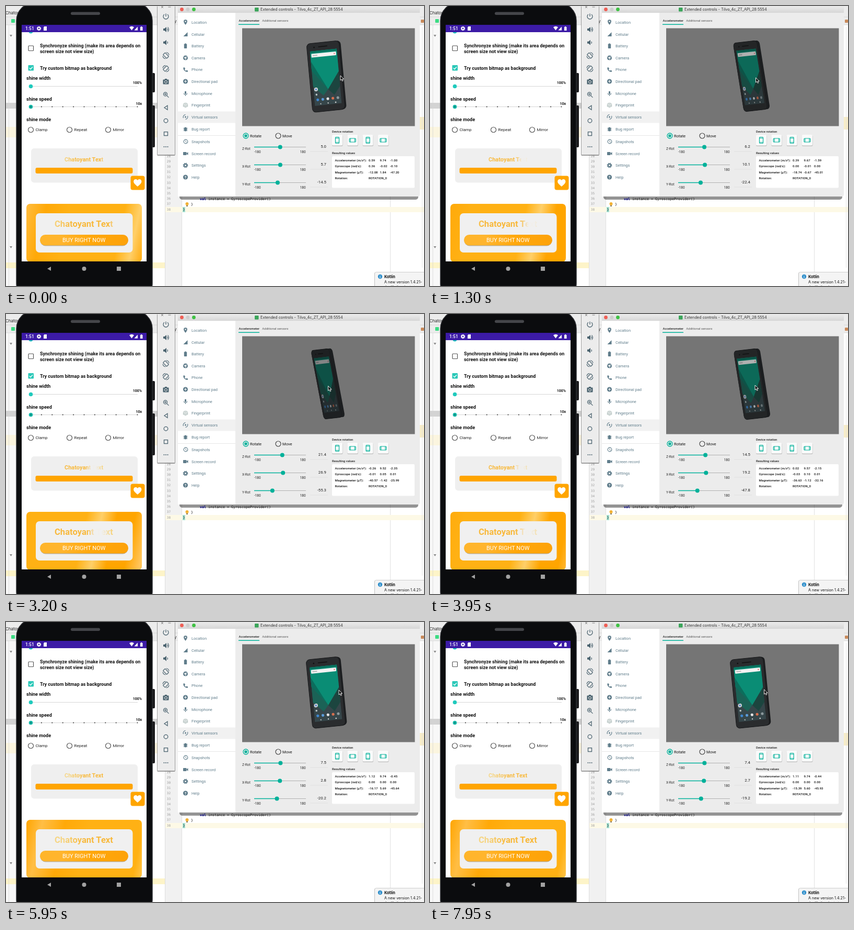
These frames come from a looping animation (800x535 px, 8000 ms). An HTML page:

```html
<!DOCTYPE html>
<html lang="en">
<head>
<meta charset="utf-8">
<title>Shining views</title>
<style>
html, body { margin: 0; width: 100%; height: 100%; overflow: hidden; background: #fff; }
svg { display: block; width: 100vw; height: 100vh; }
text { font-family: Roboto, sans-serif; white-space: pre; }
.ui { font-family: Inter, sans-serif; }
.code { font-family: "DejaVu Sans Mono", monospace; }
</style>
</head>
<body>
<svg id="stage" viewBox="0 0 800 535"></svg>
<script>
const GREEN = '#00b19a', SLATE = '#607d8b', ORANGE = '#ffa500', AMBER = '#ffb114';
const rect = (x, y, w, h, fill, r = 0, more = '') =>
  `<rect x="${x}" y="${y}" width="${w}" height="${h}" rx="${r}" fill="${fill}" ${more}/>`;
const circle = (x, y, r, fill, more = '') => `<circle cx="${x}" cy="${y}" r="${r}" fill="${fill}" ${more}/>`;
const path = (d, fill, more = '') => `<path d="${d}" fill="${fill}" ${more}/>`;
const line = (d, color, w = 1) => path(d, 'none', `stroke="${color}" stroke-width="${w}"`);
const text = (x, y, size, str, fill = '#111', more = '') =>
  `<text x="${x}" y="${y}" font-size="${size}" fill="${fill}" ${more}>${str}</text>`;
const at = (x, y, body) => `<g transform="translate(${x} ${y})">${body}</g>`;
const BOLD = 'font-weight="700"', MED = 'font-weight="500"', END = 'text-anchor="end"';

const gradient = (id, stops) => `<linearGradient id="${id}">` +
  stops.map(([o, c]) => `<stop offset="${o}" stop-color="${c}"/>`).join('') + '</linearGradient>';

// Moving gradients keep their main highlight in the middle of the span
const ink = (base, pale, glow) =>
  [[0, pale], [.06, pale], [.2, base], [.43, base], [.49, glow], [.53, glow], [.59, pale], [.8, base]];
const sheen = [[0, ORANGE], [.06, ORANGE], [.115, '#ffbe45'], [.19, '#ffa908'], [.27, AMBER], [.45, AMBER],
  [.5, '#ffcf68'], [.55, ORANGE], [.61, ORANGE], [.66, '#ffc55c'], [.71, ORANGE]];

const defs = `<defs>
  ${gradient('inkSmall', ink('#f8b93c', '#f6d583', '#f0eeea'))}
  ${gradient('inkBig', ink('#f8b93c', '#f6d583', '#f1efeb'))}
  ${gradient('sheen', sheen)}
  ${gradient('pill', [[0, '#ffb52a'], [.25, '#ffb52e'], [.6, '#ffa70a'], [1, '#fda20a']])}
  <linearGradient id="bar" x2="0" y2="1"><stop stop-color="#ececec"/><stop offset="1" stop-color="#d6d6d6"/></linearGradient>
  <clipPath id="app">${rect(30, 50, 239, 438, '#fff')}</clipPath>
  <filter id="soft" x="-20%" y="-20%" width="140%" height="150%"><feGaussianBlur stdDeviation="9"/></filter>
  <filter id="edge" x="-20%" y="-20%" width="140%" height="150%"><feGaussianBlur stdDeviation="1"/></filter>
</defs>`;

function editor() {
  let s = rect(0, 0, 800, 535, '#fff') + rect(0, 0, 800, 36, '#ececec') + rect(0, 36, 22, 499, '#f8f8f8');
  s += line('M0 21H800M0 36H800', '#cfcfcf', .7);
  s += text(-1, 16, 8, 'Chatoy', '#222', 'class="ui"') + text(316, 32, 8, 'Gy', '#222', 'class="ui"');
  s += rect(10, 25, 7, 7, '#3ddc84', 1);
  s += rect(0, 185, 305, 11, '#d3d3d3') + rect(0, 231, 305, 20, '#fbf5df') + rect(0, 490, 305, 11, '#fdf4c8');
  s += line('M5.5 36V535', '#d2d2d2', .7) + path('M7 459h5l-2.5 4z', '#888') + path('M7 55h5l-2.5 4z', '#888');
  s += rect(304, 36, 32, 499, '#f1f1f1') + line('M304.5 36V535M336.5 36V535M735.5 36V535', '#d5d5d5', .7);
  s += rect(305, 384, 495, 10, '#fdf9e6') + rect(338, 384, 5, 10, '#a5e3d5');
  for (let i = 28; i < 39; i++) s += text(315, 390.5 - (38 - i) * 10.2, 6, i, '#999', `class="code" ${END}`);
  s += rect(792, 212, 8, 24, '#f8edc8') + rect(794, 26, 6, 6, '#c98a5a', 1) + line('M796.5 40V500', '#ddd', .7);
  return s;
}

function code() {
  return text(371, 371, 6.65, '<tspan fill="#000080" font-weight="700">val</tspan> instance = GyroscopeProvider()', '#111', 'class="code"') +
    text(354, 381, 6.65, '}', '#111', 'class="code"') + text(338.5, 391, 6.65, '}', '#111', 'class="code"') +
    circle(346.5, 378, 3, '#f2b134') + rect(345, 381, 3, 2, '#8a7a55');
}

function notice() {
  return rect(705, 509, 110, 40, '#aaa', 3, 'filter="edge"') + rect(705.5, 508.5, 110, 40, '#f4f4f4', 3, 'stroke="#bcbcbc" stroke-width=".7"') +
    circle(716, 517, 4.2, '#2f8fcb') + text(714.9, 520, 7, 'i', '#fff', BOLD) +
    text(724, 520, 7.4, 'Kotlin', '#111', 'class="ui" font-weight="700"') +
    text(724, 530, 7.2, 'A new version 1.4.21-', '#111', 'class="ui"') +
    text(724, 539.5, 7.2, 'the Kotlin plugin is', '#111', 'class="ui"');
}

function handset() {
  let s = rect(279, 128, 6, 37, '#1b1b1d', 2) + rect(279, 190, 6, 80, '#1b1b1d', 2);
  s += rect(20, -6, 260, 570, '#0b0c0e', 34, 'stroke="#2b2c30" stroke-width="1.500"');
  s += rect(124, 11.5, 56, 5.5, '#45464a', 2.7);
  s += rect(30, 36, 239, 14, '#3c1ba6') + text(37, 46, 8.5, '1:51', '#fff', MED);
  s += circle(63, 43, 2.4, 'none', 'stroke="#fff" stroke-width="2"') + circle(63, 43, 3.8, 'none', 'stroke="#fff" stroke-width="1" stroke-dasharray="1.5 1.5"');
  s += path('M73.5 39h4.5v8h-6v-6.5z', '#fff');
  s += path('M236 40.5q4.5-3.5 9 0l-4.5 6z', '#fff') + path('M252 39.5v7h-6.5z', '#fff') + rect(257, 40, 4.5, 7, '#fff', .6) + rect(258.2, 39, 2, 1.5, '#fff');
  s += rect(30, 50, 239, 438, '#fff') + `<g clip-path="url(#app)">` + form() + cards() + '</g>';
  s += path('M86 498v8l-7-4z', '#a2a2a2') + circle(149.5, 502, 4, '#a2a2a2') + rect(212, 498, 8, 8, '#a2a2a2');
  return s;
}

function form() {
  let s = circle(47.5, 48.5, 4, '#1ec4c0');
  s += rect(43, 76, 9.5, 9.5, 'none', 1, 'stroke="#555" stroke-width="1.2"');
  s += text(65, 79, 8.98, 'Synchronyze shining (make its area depends on', '#111', BOLD) + text(65, 90, 8.98, 'screen size not view size)', '#111', BOLD);
  s += rect(42.5, 113, 10.5, 10.5, '#2ac8b8', 1.3) + line('M44.8 118.5l2.2 2.2 4-4.5', '#fff', 1.3);
  s += text(65, 122, 8.98, 'Try custom bitmap as background', '#111', BOLD);
  s += text(39, 141, 9, 'shine width', '#111', BOLD) + text(260, 149, 7, '100%', '#111', `${BOLD} ${END}`);
  s += text(39, 181, 9, 'shine speed', '#111', BOLD) + text(260, 188.5, 7, '10x', '#111', `${BOLD} ${END}`);
  s += line('M47 153.5H252M47 192.5H252', '#d6d6d6', 1.2);
  for (let i = 1; i < 11; i++) s += circle(47.5 + i * 20.4, 192.5, 1, '#333');
  s += circle(47.5, 153.5, 3.8, '#20cabd') + circle(47.5, 192.5, 3.8, '#16b9a9') + circle(47.5, 192.5, 1.2, '#0a6f69');
  s += text(39, 220, 9, 'shine mode', '#111', BOLD);
  ['Clamp', 'Repeat', 'Mirror'].forEach((name, i) => {
    const x = 47.5 + i * 74;
    s += circle(x, 236.5, 5, 'none', 'stroke="#555" stroke-width="1.2"') + text(x + 9, 239.3, 8, name, '#222');
  });
  return s;
}

function cards() {
  return rect(48, 272, 204, 65.5, '#efefef', 6) +
    text(112, 297, 11, 'Chatoyant Text', 'url(#inkSmall)', BOLD) +
    rect(56.5, 309, 186, 11, ORANGE, 3) +
    rect(238.5, 324.5, 27, 27, ORANGE, 4) +
    path('M251.8 345c-5-4.3-7.6-6.5-7.6-9.7 0-4.6 5.5-5.6 7.6-2.2 2.1-3.4 7.6-2.4 7.6 2.2 0 3.2-2.6 5.4-7.6 9.7z', '#fff') +
    rect(39, 378, 221, 111, 'url(#sheen)', 7) +
    rect(57, 396, 185.5, 75, '#f0f0f0', 7) +
    text(93, 422, 16.6, 'Chatoyant Text', 'url(#inkBig)', BOLD) +
    rect(65.5, 438.5, 168, 20, '#888', 10, 'filter="edge" opacity=".7"') +
    rect(65, 437, 169, 20.5, 'url(#pill)', 10) +
    text(108, 451, 11, 'BUY RIGHT NOW', '#fff');
}

function toolbar() {
  const c = '#4c6470', st = `stroke="${c}" stroke-width="1.3"`;
  const speaker = path('M-5-2h2.5l3.5-3v10l-3.5-3H-5z', c);
  const turn = `<g transform="rotate(-45)">${rect(-2.8, -5, 5.6, 10, 'none', 1, st)}</g>` +
    line('M-6 1a6 6 0 0 0 5.5 5M6-1a6 6 0 0 0-5.500-5', c, 1.1);
  const icons = [
    line('M0-5.5V0M-3-4a5 5 0 1 0 6 0', c, 1.3),
    speaker + line('M2.5-2q2 2 0 4M3.5-4.5q4 4.5 0 9', c, 1.2),
    speaker + line('M2.5-2q2 2 0 4', c, 1.2),
    turn, `<g transform="scale(-1 1)">${turn}</g>`,
    rect(-5.5, -4, 11, 9, c, 1) + rect(-2, -5.5, 4, 2, c) + circle(0, .5, 2.5, c, 'stroke="#eee" stroke-width="1"'),
    circle(-1, -1, 3.5, 'none', st) + line('M1.5 1.5l4 4M-3-1h4M-1-3v4', c, 1.2),
    path('M3-4v8l-6-4z', 'none', st), circle(0, 0, 3.8, 'none', st), rect(-3.5, -3.5, 7, 7, 'none', 0, st),
    circle(-3.5, 0, 1.1, c) + circle(0, 0, 1.1, c) + circle(3.5, 0, 1.1, c)
  ];
  return rect(289, 0, 35, 286, '#777', 2, 'filter="edge" opacity=".7"') + rect(290, 0, 33, 284, '#ececec') +
    line('M297 0l4 4m0-4l-4 4M310.5 2h5', '#777', .9) +
    icons.map((icon, i) => at(306, 20 + i * 24.9, icon)).join('');
}

function sidebar() {
  const c = SLATE, st = `stroke="${c}" stroke-width="1.2"`;
  const items = [
    ['Location', 31, path('M0 5C-6-2-3-5 0-5s6 3 0 10z', c) + circle(0, -1.5, 1.2, '#fff')],
    ['Cellular', 54, path('M4-4v8h-8z', c)],
    ['Battery', 76.5, rect(-2.7, -4, 5.4, 8.5, c, .8) + rect(-1.2, -5, 2.4, 1.5, c)],
    ['Camera', 99, circle(0, 0, 4.6, c) + circle(0, 0, 1.7, '#fff') + line('M0-1.7h4M1.5 1l-2 3.5M-1.5 1l-2-3.5', '#fff', .7)],
    ['Phone', 121.5, path('M-4-4h2.5l1 2.5-1.2 1.2q1 2 2.5 2.5L2 1l2.5 1v2.3C-1 5-5 0-4-4z', c)],
    ['Directional pad', 144, circle(0, 0, 4.6, c) + line('M-2.5 0h5M0-2.5v5', '#fff', 1)],
    ['Microphone', 167, rect(-1.5, -4.5, 3, 6, c, 1.5) + line('M-3.3-.5q0 3.3 3.3 3.3T3.3-.5M0 3v2', c, 1)],
    ['Fingerprint', 189.5, line('M-4 3v-4q0-3 4-3t4 3v4M-2 4v-4q0-2 2-2t2 2v4M0 0v5', '#8fa3a0', .9)],
    ['Virtual sensors', 212, circle(0, 0, 1.5, c) + line('M-4 2a4.5 4.5 0 0 1 4-6.3M4-2a4.5 4.5 0 0 1-4 6.3', c, 1.2)],
    ['Bug report', 235, rect(-2.5, -3.5, 5, 8, c, 2.5) + line('M-4-1.5h8M-4 .7h8M-4 3h8', c, .9)],
    ['Snapshots', 259, circle(.5, 0, 3.8, 'none', st) + line('M.5-2v2.5l1.7 1', c, .9)],
    ['Screen record', 282, rect(-4.5, -3, 6.5, 6, c, .7) + path('M2-.8l3-2v5.6l-3-2z', c)],
    ['Settings', 304.5, circle(0, 0, 2.7, 'none', `stroke="${c}" stroke-width="2.2"`) + circle(0, 0, 4.3, 'none', `stroke="${c}" stroke-width="1.3" stroke-dasharray="1.7 1.7"`)],
    ['Help', 327, circle(0, 0, 4.6, c) + text(-1.7, 2.5, 7, '?', '#fff', BOLD)]
  ];
  return rect(329, 13, 110, 351, '#fff') + rect(329, 201.5, 110, 22, '#f1f1f1') + line('M329 247.5H439', '#e0e0e0', .8) +
    items.map(([name, y, icon]) => at(343.5, y, icon) + text(355, y + 2.7, 7.5, name, SLATE)).join('');
}

function controls() {
  let s = rect(332, 8, 457, 362, '#000', 5, 'filter="soft" opacity=".42"') + code() + rect(329, 0, 463, 364, '#ececec', 4);
  s += rect(329, 0, 463, 13, 'url(#bar)') + circle(336.5, 6.5, 3.4, '#ee5f56') + circle(348, 6.5, 3.4, '#cdcdcd') + circle(359.5, 6.5, 3.4, '#3fc144');
  s += rect(476, 3, 7.5, 7.5, '#3ba55a', 1) + text(487, 9.3, 7.3, 'Extended controls - Tilvo_4c_ZT_API_28:5554', '#333', 'class="ui"');
  s += sidebar();
  s += text(445.5, 30, 6, 'Accelerometer', '#222', MED) + text(490.3, 30, 6.05, 'Additional sensors', '#555') + rect(445, 34.5, 40, 1.5, GREEN);
  s += rect(452, 42.5, 330.5, 187, '#757575');
  s += circle(459, 248, 5, 'none', `stroke="${GREEN}" stroke-width="1.3"`) + circle(459, 248, 2.8, GREEN) + text(467, 251, 7.6, 'Rotate');
  s += circle(521, 248, 5, 'none', 'stroke="#444" stroke-width="1.2"') + text(529, 251, 7.6, 'Move');
  ['Z', 'X', 'Y'].forEach((name, i) => {
    const y = 269.5 + i * 34;
    s += text(452, y + 5.7, 6.6, name + '-Rot', '#333') + line(`M475 ${y}H574`, '#aaa', .9) + line(`M582 ${y + 8.5}H616`, '#dadada', .7);
    s += text(475, y + 11.5, 6.4, '-180', '#222') + text(573.5, y + 11.5, 6.4, '180', '#222', END);
    s += `<path id="track${i}" stroke="${GREEN}" stroke-width="1.3"/>` + circle(0, y, 4, GREEN, `id="knob${i}"`);
    s += text(613, y + 1.6, 7.8, '', '#222', `id="rot${i}" ${END}`);
  });
  s += text(624, 242, 6, 'Device rotation', '#222', MED) + text(624, 282.5, 6, 'Resulting values', '#222', MED);
  for (let i = 0; i < 4; i++) {
    const x = 634 + i * 29.3;
    s += rect(x - 10, 247, 20.5, 21, '#999', 2, 'filter="edge" opacity=".5"') + rect(x - 10, 246, 20, 20.5, '#fafafa', 2);
    s += `<g transform="translate(${x} 256.5) rotate(${i * 90})">` +
      rect(-3.5, -6, 7, 12, 'none', 1.2, `stroke="${GREEN}" stroke-width="1.2"`) + line('M-3.5-4h7M-3.5 4h7', GREEN, 1) + '</g>';
  }
  s += rect(624, 287, 158, 60.5, '#fff', 2);
  ['Accelerometer (m/s²):', 'Gyroscope (rad/s):', 'Magnetometer (μT):', 'Rotation:'].forEach((label, i) => {
    const y = 297.3 + i * 11.1;
    s += text(629.5, y, 6.1, label, '#111', MED);
    if (i < 3) for (let j = 0; j < 3; j++) s += text([694, 715.5, 735][j], y, 6.1, '', '#111', `id="v${i * 3 + j}" ${MED}`);
    else s += text(694, y, 6.1, 'ROTATION_0', '#111', MED);
  });
  return s;
}

// Tilting device, drawn flat in a 63 x 131 box
function device() {
  let s = rect(0, 0, 63, 131, '#2a2c2e', 7, 'stroke="#1a1b1d" stroke-width="1"');
  s += rect(22, 7, 18, 1.6, '#111', .8) + circle(14, 8, 1.4, '#111');
  s += rect(5.5, 15, 52, 104, '#36464a') + path('M5.5 15h52v43L34 90 5.5 52z', '#0a8d75');
  s += path('M5.5 34L34 90 5.5 52z', '#0c6d5c') + path('M5.5 52L34 90 24 101 5.5 82z', '#1b6256') + path('M57.5 58L34 90l11 12 12.5-16z', '#1c453f');
  s += rect(5.5, 15, 52, 3.5, '#07705d') + rect(7.5, 20, 48, 7, '#f2f2f2', 1) + rect(10, 22.5, 9, 2, '#b9b9b9') + circle(52, 23.5, 1.2, '#d66');
  s += circle(10.5, 88, 3.6, '#d9d8d4') + circle(10.5, 88, 1.9, '#5b8bd0') + circle(10.5, 98, 1.8, '#b9c4c6');
  ['#3f87d0', '#5b9bd8', '#e4e4e4', '#d8704e', '#8b989c'].forEach((c, i) => s += circle(12 + i * 9.8, 108, 2.6, c));
  s += path('M18 114.5v3l-2.5-1.5z', '#ccc') + circle(31.5, 116, 1.2, '#ccc') + rect(45, 115, 2.4, 2.4, '#ccc');
  return `<g id="side">${rect(0, 0, 63, 131, '#1c1e20', 7)}</g><g id="front">${s}${rect(0, 0, 63, 131, '#121516', 7, 'id="dim"')}</g>` +
    `<g id="cursor">${path('M0 0v9l2.2-1.9 1.5 3.3 1.6-.7-1.5-3.2h2.9z', '#111', 'stroke="#fff" stroke-width=".9"')}</g>`;
}

document.getElementById('stage').innerHTML = defs + editor() + notice() + handset() + toolbar() + controls() + device();
const $ = id => document.getElementById(id);
const set = (id, attrs) => { for (const k in attrs) $(id).setAttribute(k, attrs[k]); };

// time | rotation z x y | accelerometer | gyroscope | magnetometer | cursor | left, width, lean | shine
const keys = [
  [0, 5, 5.7, -14.5, .59, 9.74, -1, .36, -.02, -.1, -12.08, 1.84, -47.2, 640, 133, 575, 65, 12, 1.1],
  [1300, 6.2, 10.1, -22.4, .39, 9.67, -1.59, 0, -.01, 0, -18.74, -.67, -45.01, 623.5, 137, 580, 50, 21, .88],
  [2450, 28.2, 34.5, -62.7, -.53, 9.46, -2.55, 0, 0, 0, -44.51, -1.71, -19.83, 611, 139, 586, 31, 29, .64],
  [3950, 14.5, 19.2, -47.8, .02, 9.57, -2.15, -.03, .1, .01, -36.63, -1.12, -32.16, 622, 136, 581, 50, 21, .82],
  [5100, 9.2, 10.6, -33.1, .57, 9.68, -1.51, 0, 0, 0, -26.72, 1.19, -40.77, 630.5, 133.5, 577, 59, 15, 1.04],
  [5950, 7.5, 2.8, -20.2, 1.12, 9.74, -.45, 0, 0, 0, -16.17, 5.69, -45.64, 637, 130, 574, 66, 13, 1.28],
  [7950, 7.4, 2.7, -19.2, 1.11, 9.74, -.44, 0, 0, 0, -15.39, 5.6, -45.93, 639.5, 129, 574, 66, 13, 1.28]
];

function sample(t) {
  let i = 0;
  while (i < keys.length - 2 && t >= keys[i + 1][0]) i++;
  const a = keys[i], b = keys[i + 1], k = Math.min(1, (t - a[0]) / (b[0] - a[0]));
  return a.map((v, j) => v + (b[j] - v) * k);
}

function draw(t) {
  const v = sample(t), [left, width, lean, shine] = v.slice(15);
  for (let i = 0; i < 3; i++) {
    const x = 523.5 + v[i + 1] * .2475;
    set('knob' + i, { cx: x });
    set('track' + i, { d: `M475 ${269.5 + i * 34}H${x}` });
    $('rot' + i).textContent = v[i + 1].toFixed(1);
  }
  for (let i = 0; i < 9; i++) $('v' + i).textContent = v[i + 4].toFixed(2);

  const depth = 3 + (66 - width) * .12, front = width - depth, top = 66 + width * .1;
  const pose = dx => `matrix(${front / 63} ${-width * .1 / 63} ${lean / 131} 1 ${left + dx} ${top - dx * .1})`;
  set('side', { transform: pose(depth) });
  set('front', { transform: pose(0) });
  set('dim', { opacity: Math.max(0, (64 - width) / 33 * .7) });
  set('cursor', { transform: `translate(${v[13]} ${v[14]})` });

  for (const id of ['inkSmall', 'inkBig']) set(id, { x1: shine - 1.3, x2: shine + 1.3, y1: 0, y2: 0 });
  const mid = shine * .9 - .05;
  set('sheen', { x1: mid - 1.3, x2: mid + 1.3, y1: .36, y2: .64 });
}

function tick(now) {
  draw(Math.floor(now % 8000 / 50) * 50);
  requestAnimationFrame(tick);
}
draw(0);
requestAnimationFrame(tick);
</script>
</body>
</html>
```
